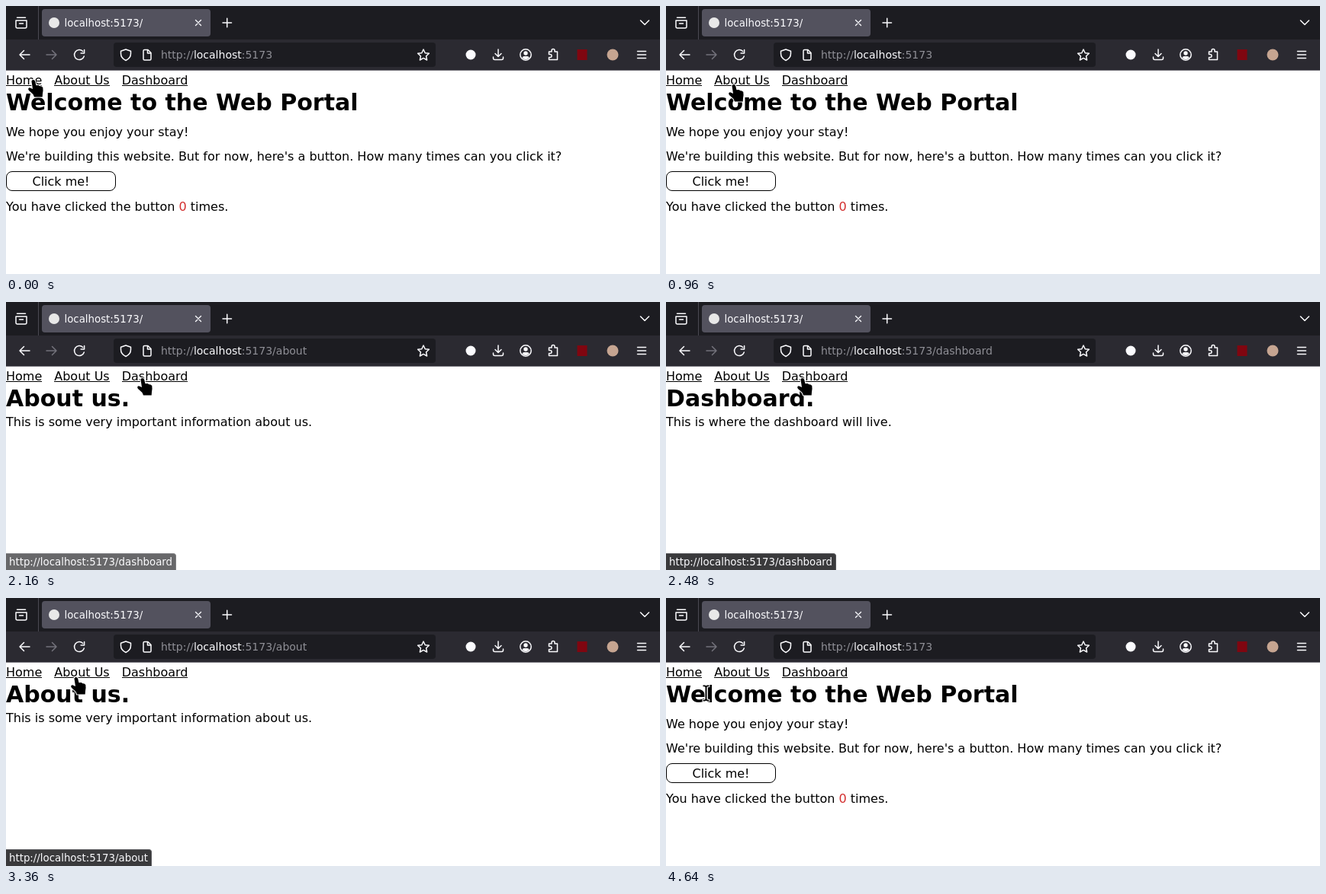
Animation of 857 by 352 pixels, one loop 4720 ms. Source, as an HTML page:

```html
<!DOCTYPE html>
<html lang="en">
<head>
<meta charset="utf-8">
<title>Web Portal</title>
<style>
  html, body { margin: 0; width: 100%; height: 100%; overflow: hidden; background: #fff; }
  svg { position: absolute; left: 0; top: 0; display: block; }
  text { font: 16px "DejaVu Sans", sans-serif; white-space: pre; }
  .h1 { font-size: 30px; font-weight: bold; }
  .tab { font-size: 13.333px; fill: #fbfbfe; }
  .url { font-size: 14px; fill: #8f8f96; }
  .icon { fill: none; stroke: #fbfbfe; stroke-width: 1.5; stroke-linecap: round; stroke-linejoin: round; }
  #status {
    position: absolute; left: 0; top: 330px; height: 22px; box-sizing: border-box;
    padding: 0 4px; border: solid #58585c; border-width: 1px 1px 0 0; border-radius: 0 4px 0 0;
    background: #3a3a3c; color: #fbfbfe; white-space: pre;
    font: 13.333px/22px "DejaVu Sans", sans-serif;
  }
  #pointer path { paint-order: stroke; stroke: #fff; stroke-width: 2; stroke-linejoin: round; }
</style>
</head>
<body>
<svg width="857" height="352" viewBox="0 0 857 352">
  <!-- browser frame -->
  <rect width="857" height="44" fill="#1c1c21"/>
  <rect y="44" width="857" height="40" fill="#2b2a31"/>
  <rect y="84" width="857" height="1" fill="#77767c"/>
  <rect x="42" width="1" height="44" fill="#4a4952"/>
  <rect x="47" y="4" width="221" height="36" rx="4" fill="#53525e"/>
  <rect x="141" y="48" width="422" height="32" rx="4" fill="#1c1c21"/>
  <circle cx="63" cy="22" r="7" fill="#e8e8e8"/>
  <text class="tab" x="76.5" y="27">localhost:5173/</text>
  <text class="url" x="203" y="69">http://<tspan fill="#fbfbfe">localhost</tspan>:5173<tspan id="path"></tspan></text>

  <g class="icon">
    <path d="M14.5 15.2h11M13 19h14v8a2 2 0 0 1-2 2H15a2 2 0 0 1-2-2zM17.500 23h5"/>
    <path d="M248.500 18.500l7 7m0-7l-7 7" stroke-width="1.300"/>
    <path d="M284 22h11.500M289.700 16.300v11.500M831.500 19l5.500 5.500 5.500-5.500"/>
    <path d="M31 64H18m5.500-5.500L18 64l5.500 5.500"/>
    <path d="M53 64h13m-5.500-5.500L66 64l-5.500 5.500" stroke="#73727b"/>
    <path d="M102.300 66a6.500 6.500 0 1 1-1.600-6.500M102.600 57.500v4.500h-4.500"/>
    <path d="M157 57l6.500 2.200v3.300q0 6-6.500 9-6.500-3-6.500-9v-3.300z"/>
    <path d="M181.500 57.500h4.500l4 4v8a1.500 1.500 0 0 1-1.500 1.500h-7a1.500 1.500 0 0 1-1.500-1.500v-10.500a1.500 1.500 0 0 1 1.500-1.500zM185.500 57.500v4.500h4.500"/>
    <path d="M547 57l2.200 4.700 5.200.6-3.800 3.500 1 5.200-4.600-2.600-4.600 2.600 1-5.200-3.800-3.500 5.200-.6z"/>
    <path d="M645 57v9.500m-4-4l4 4 4-4M638.500 67v1.500a2 2 0 0 0 2 2h9a2 2 0 0 0 2-2V67"/>
    <circle cx="681" cy="64" r="7.200"/>
    <path d="M711.500 60h3.500v-1.500a2 2 0 0 1 4 0V60h3.500v10.500h-11v-3h1.500a2 2 0 0 0 0-4h-1.500z"/>
    <path d="M827.500 59.500h11M827.500 64h11M827.500 68.500h11"/>
  </g>
  <path d="M676.500 68.500q0-2.500 2.500-2.500h4q2.500 0 2.500 2.500-4.500 3.500-9 0z" fill="#fbfbfe"/>
  <circle cx="681" cy="62" r="2.700" fill="#fbfbfe"/>
  <circle cx="609" cy="64" r="6.500" fill="#fbfbfe"/>
  <rect x="748.500" y="57" width="13" height="14" fill="#800610"/>
  <circle cx="795" cy="64" r="7.500" fill="#c6a591"/>

  <!-- site -->
  <text x="0" y="103">Home</text>
  <text x="63.250" y="103">About Us</text>
  <text x="151.700" y="103">Dashboard</text>
  <path d="M0 104.500h47M63 104.500h73M152 104.500h86" stroke="#000"/>
  <g class="page">
    <text class="h1" y="137">Welcome to the Web Portal</text>
    <text y="171">We hope you enjoy your stay!</text>
    <text y="203">We're building this website. But for now, here's a button. How many times can you click it?</text>
    <rect x=".5" y="217.500" width="143" height="25" rx="7.500" fill="none" stroke="#000"/>
    <text x="72" y="236" text-anchor="middle">Click me!</text>
    <text y="269">You have clicked the button <tspan fill="#d32f2f">0</tspan> times.</text>
  </g>
  <g class="page">
    <text class="h1" y="137">About us.</text>
    <text y="163">This is some very important information about us.</text>
  </g>
  <g class="page">
    <text class="h1" y="137">Dashboard.</text>
    <text y="163">This is where the dashboard will live.</text>
  </g>
</svg>
<div id="status"></div>
<svg width="857" height="352" viewBox="0 0 857 352">
  <g id="pointer">
    <path id="hand" d="M-2.500 2Q-2.500 0-.3 0 1.700 0 2.200 2L3.500 7.200 6.500 7 8.500 8.200 10.500 8.400 12.300 10Q13 14 12 18L11.700 22.500H1L-.5 19-6 14Q-8 11-5 10.200L-1 12Z"/>
    <path id="beam" d="M-4-10.500H-1.500L0-9.700 1.500-10.500H4V-8.700H2L1-7.800V7.800L2 8.700H4V10.500H1.500L0 9.700-1.500 10.500H-4V8.700H-2L-1 7.800V-7.800L-2-8.700H-4Z"/>
  </g>
</svg>
<script>
  const LOOP = 4720, STEP = 80, LINK_BOTTOM = 109, DIP = 13;
  const $ = id => document.getElementById(id);
  const show = (el, on) => el.style.display = on ? '' : 'none';
  const pages = document.querySelectorAll('.page');

  const links = [
    { path: '', left: 0, right: 47 },
    { path: '/about', left: 63, right: 136 },
    { path: '/dashboard', left: 152, right: 238 }
  ];
  // When a link's address pops up, and when the link is clicked
  const visits = [
    { link: 0, hint: 240, click: 0 },
    { link: 1, hint: 1040, click: 1200 },
    { link: 2, hint: 2160, click: 2400 },
    { link: 1, hint: 3120, click: 3360 },
    { link: 0, hint: 4160, click: 4400 }
  ];
  // Pointer glides; it rests wherever the last one ended
  const glides = [
    { from: 0, to: 0, x: 36, y: 97 },
    { from: 240, to: 960, x: 89, y: 103 },
    { from: 1200, to: 1920, x: 179, y: 100 },
    { from: 2480, to: 3200, x: 92, y: 104 },
    { from: 3360, to: 3920, x: 34, y: 114 },
    { from: 3920, to: 4000, x: 34, y: 102 },
    { from: 4400, to: 4640, x: 52.5, y: 125 }
  ];

  // Ease out along an arc that sags below the links
  function pointerAt(t) {
    const i = glides.findLastIndex(g => g.from <= t);
    const end = glides[i], start = glides[Math.max(i - 1, 0)];
    const k = t >= end.to ? 1 : (t - end.from) / (end.to - end.from);
    const e = 1 - (1 - k) ** 2;
    return {
      x: start.x + (end.x - start.x) * e,
      y: start.y + (end.y - start.y) * e + DIP * Math.sin(Math.PI * e)
    };
  }

  const isOver = (link, p) => p.y < LINK_BOTTOM && p.x >= link.left && p.x <= link.right;

  function draw(time) {
    const t = Math.floor(time % LOOP / STEP) * STEP;

    const page = visits.findLast(v => v.click <= t).link;
    pages.forEach((el, i) => show(el, i === page));
    $('path').textContent = links[page].path;

    const p = pointerAt(t);
    const onLink = links.some(link => isOver(link, p));
    show($('hand'), onLink);
    show($('beam'), !onLink);
    $('pointer').setAttribute('transform', `translate(${p.x} ${p.y})`);

    const visit = visits.findLast(v => v.hint <= t);
    const hinted = visit && isOver(links[visit.link], p);
    show($('status'), hinted);
    if (hinted) {
      $('status').textContent = 'http://localhost:5173' + links[visit.link].path;
      $('status').style.opacity = t === visit.hint ? 0.76 : 1;
    }
  }

  const start = performance.now();
  function tick() {
    draw(performance.now() - start);
    requestAnimationFrame(tick);
  }
  tick();
</script>
</body>
</html>
```
